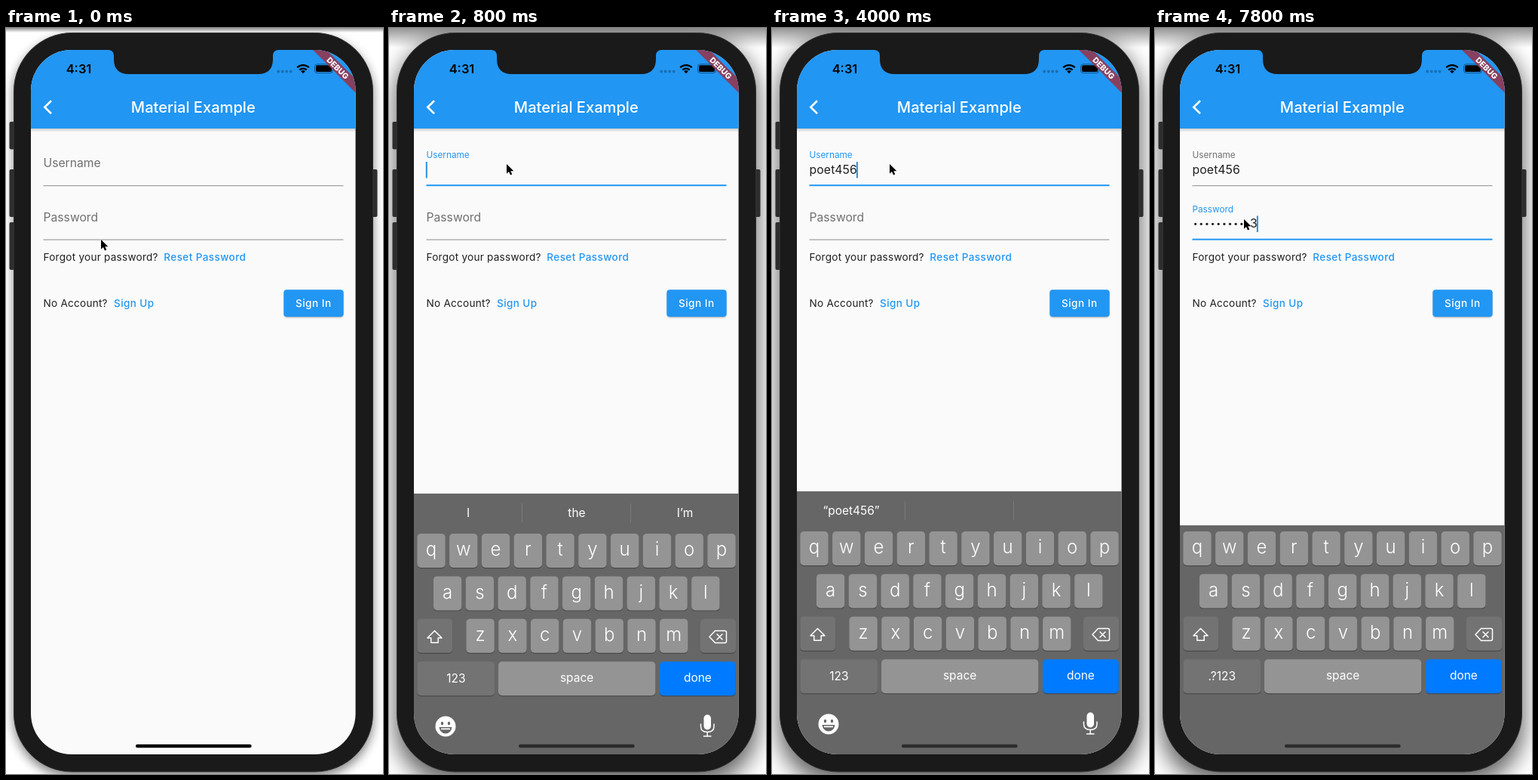
An HTML page that plays this animation: 500x987 px, repeating every 8000 ms.

```html
<!DOCTYPE html>
<html lang="en">
<head>
<meta charset="utf-8">
<title>Sign in form</title>
<style>
  html, body { margin: 0; width: 100%; height: 100%; overflow: hidden; background: #fff; }
  svg { display: block; width: 500px; height: 987px; font-family: Inter, Roboto, sans-serif; }
  .mid { text-anchor: middle; }
  .body { font-size: 13.6px; letter-spacing: .23px; fill: #1f1f1f; }
  .link { font-size: 13.5px; letter-spacing: .42px; font-weight: 500; fill: #2196f3; }
  .field { font-size: 15.8px; letter-spacing: .1px; fill: #1f1f1f; }
  .label { font-size: 15.7px; }
  .key { font-size: 24px; font-weight: 300; fill: #fff; }
  .word { font-size: 15.5px; fill: #fff; }
  .line { fill: none; stroke: #fff; stroke-width: 1.5; stroke-linejoin: round; stroke-linecap: round; }
</style>
</head>
<body>
<svg viewBox="0 0 500 987">
  <defs>
    <clipPath id="screen"><rect x="33" y="29" width="430.600" height="932" rx="54"/></clipPath>
    <filter id="blurS" x="-20%" y="-20%" width="140%" height="140%"><feGaussianBlur stdDeviation="7"/></filter>
    <filter id="blurL" x="-20%" y="-20%" width="140%" height="140%"><feGaussianBlur stdDeviation="15"/></filter>
    <filter id="soft" x="-20%" y="-50%" width="140%" height="200%"><feGaussianBlur stdDeviation="1.3"/></filter>
    <linearGradient id="topS" x2="0" y2="1"><stop stop-color="#000" stop-opacity=".42"/><stop offset="1" stop-opacity="0"/></linearGradient>
    <linearGradient id="barShade" x2="0" y2="1"><stop stop-color="#000" stop-opacity=".18"/><stop offset="1" stop-opacity="0"/></linearGradient>
  </defs>

  <rect width="500" height="987" fill="#fff"/>
  <g id="dimShadow">
    <rect x="10" y="12" width="477" height="978" rx="77" opacity=".5" filter="url(#blurS)"/>
    <rect width="500" height="6" fill="url(#topS)"/>
  </g>
  <g id="deepShadow">
    <rect x="8" y="16" width="481" height="984" rx="77" opacity=".62" filter="url(#blurL)"/>
    <rect width="500" height="26" fill="url(#topS)"/>
  </g>

  <g fill="#2e2e2e">
    <rect x="4.500" y="124" width="10" height="36.500" rx="2"/>
    <rect x="4.500" y="187" width="10" height="63" rx="2"/>
    <rect x="4.500" y="257" width="10" height="63" rx="2"/>
    <rect x="482.500" y="187" width="10" height="63" rx="2"/>
  </g>
  <rect x="10.500" y="6.500" width="476" height="977.500" rx="77" fill="#1a1a1a" stroke="#303030"/>

  <g clip-path="url(#screen)">
    <rect x="33" y="29" width="431" height="932" fill="#fafafa"/>
    <rect x="33" y="133" width="431" height="5" fill="url(#barShade)"/>
    <rect x="33" y="29" width="431" height="104" fill="#2196f3"/>
    <path d="M60 96.300L51.300 104.700L60 113.200" fill="none" stroke="#fff" stroke-width="2.600"/>
    <text class="mid" x="248.300" y="111.800" font-size="20.100" font-weight="500" fill="#fff">Material Example</text>

    <text class="mid" x="96.500" y="59.800" font-size="16.500" font-weight="600">4:31</text>
    <g fill="#000" opacity=".26">
      <circle cx="361.200" cy="57.500" r="1.900"/><circle cx="366.700" cy="57.500" r="1.900"/>
      <circle cx="372.200" cy="57.500" r="1.900"/><circle cx="377.700" cy="57.500" r="1.900"/>
    </g>
    <g fill="none" stroke="#000" stroke-width="2.300">
      <path d="M386.200 52.300A11 11 0 0 1 401.800 52.300"/>
      <path d="M389.300 55.500A6.700 6.700 0 0 1 398.700 55.500"/>
    </g>
    <path d="M391.200 57.300A4 4 0 0 1 396.800 57.300L394 60.200Z"/>
    <rect x="409.500" y="47.800" width="24" height="11.800" rx="3.400" fill="none" stroke="#000" stroke-opacity=".45"/>
    <rect x="411" y="49.300" width="21" height="8.800" rx="2.200"/>

    <g id="fields"></g>
    <text class="body" x="49.500" y="308.300">Forgot your password?</text>
    <text class="link" x="209.300" y="308.300">Reset Password</text>
    <text class="body" x="49.500" y="369">No Account?</text>
    <text class="link" x="143" y="369">Sign Up</text>
    <rect x="369" y="348" width="78" height="35" rx="4" opacity=".35" filter="url(#soft)"/>
    <rect x="368.300" y="346.300" width="79.400" height="35.700" rx="4" fill="#2196f3"/>
    <text class="mid" x="407.800" y="369" font-size="13.600" font-weight="500" letter-spacing=".5" fill="#fff">Sign In</text>

    <g id="keyboard">
      <rect id="board" x="33" width="431" height="400" fill="#666"/>
      <g id="hints">
        <path d="M176.500 626V651M320.500 626V651" stroke="#7b7b7b"/>
      </g>
      <g id="keys"></g>
      <path class="line" d="M60.500 794.500L70 804H65.200V810.300H55.800V804H51Z"/>
      <path class="line" d="M432.500 794.500H445.500Q447.500 794.500 447.500 796.500V808.500Q447.500 810.500 445.500 810.500H432.500L425 802.500ZM435 799L442 806M442 799L435 806"/>
      <g id="extras">
        <circle cx="75" cy="921" r="13.500" fill="#fff"/>
        <g fill="#666">
          <ellipse cx="70.500" cy="917" rx="1.700" ry="2.300"/><ellipse cx="79.500" cy="917" rx="1.700" ry="2.300"/>
          <path d="M66.500 922H83.500Q82 930.500 75 930.500Q68 930.500 66.500 922Z"/>
        </g>
        <path d="M69 924.300H81" stroke="#fff" stroke-width="1.800"/>
        <rect x="417.500" y="905.500" width="9.500" height="20" rx="4.750" fill="#fff"/>
        <path class="line" d="M413.500 918V921Q413.500 928.500 422.200 928.500Q431 928.500 431 921V918M422.200 928.500V934M417.500 934H427"/>
      </g>
    </g>

    <g transform="translate(440 53) rotate(45)">
      <rect x="-60" y="-6.300" width="120" height="12.600" fill="#87405f"/>
      <text class="mid" y="3.800" font-size="10.400" font-weight="800" fill="#fff">DEBUG</text>
    </g>
    <rect id="home" x="172" y="947.700" width="153.700" height="4.600" rx="2.300"/>
  </g>
  <path d="M136 28V29Q143 29.500 143 37V41Q143 61 163 61H334Q354 61 354 41V37Q354 29.500 361 29V28Z" fill="#1a1a1a"/>

  <path id="mouse" d="M0 0V14.500L3.400 11.400L5.700 16.500L8.300 15.400L6 10.400H10.600Z" stroke="#fff" stroke-width="1" paint-order="stroke"/>
</svg>
<script>
const $ = id => document.getElementById(id);
const LOOP = 8000, NAME_AT = 430, PASS_AT = 4530;

function add(parent, tag, attrs, text = '') {
  const el = document.createElementNS('http://www.w3.org/2000/svg', tag);
  for (const k in attrs) el.setAttribute(k, attrs[k]);
  el.textContent = text;
  parent.append(el);
  return el;
}

const clamp = x => Math.max(0, Math.min(1, x));
const mix = (a, b, p) => a + (b - a) * p;
const blend = (a, b, p) => `rgb(${a.map((v, i) => Math.round(mix(v, b[i], p)))})`;
const show = (el, on) => el.setAttribute('visibility', on ? 'visible' : 'hidden');

// cubic-bezier(.4, 0, .2, 1)
function ease(x) {
  x = clamp(x);
  let lo = 0, hi = 1, s = x;
  for (let i = 0; i < 20; i++) {
    s = (lo + hi) / 2;
    const bx = 1.2 * s * (1 - s) ** 2 + .6 * s * s * (1 - s) + s ** 3;
    if (bx < x) lo = s; else hi = s;
  }
  return 3 * s * s * (1 - s) + s ** 3;
}

// Keyboard
function key(x, y, w, label, cls, fill = '#949494', dy = 29.3) {
  add($('keys'), 'rect', { x, y: y + 1.2, width: w, height: 45, rx: 5, fill: '#4a4a4a' });
  add($('keys'), 'rect', { x, y, width: w, height: 45, rx: 5, fill });
  return add($('keys'), 'text', { x: x + w / 2, y: y + dy, class: 'mid ' + cls }, label);
}
[['qwertyuiop', 37.3, 666], ['asdfghjkl', 58.9, 722.4], ['zxcvbnm', 102.4, 778.8]].forEach(([row, x, y]) =>
  [...row].forEach((c, i) => key(x + i * 42.78, y, 37.4, c, 'key')));
key(37.3, 778.8, 47, '', 'word', '#737373');
key(413, 778.8, 47, '', 'word', '#737373');
const modeKey = key(37.3, 835.2, 103, '123', 'word', '#737373', 27.8);
key(145, 835.2, 208.3, 'space', 'word', '#949494', 26.5);
key(359, 835.2, 100.8, 'done', 'word', '#007aff', 26.5);
const hints = [105, 249, 392.5].map(x => add($('hints'), 'text', { x, y: 644.3, class: 'mid word' }));

// Form fields
function makeField(name, y) {
  const g = $('fields');
  return {
    y,
    line: add(g, 'rect', { x: 49.5, width: 398 }),
    label: add(g, 'text', { class: 'label' }, name),
    dots: add(g, 'g', { fill: '#1f1f1f' }),
    text: add(g, 'text', { class: 'field', y: y + 14.5 }),
    caret: add(g, 'rect', { y: y - 1, width: 2, height: 21.5, fill: '#2b8fe0' })
  };
}
const nameField = makeField('Username', 178), passField = makeField('Password', 249.5);
const GREY = [112, 112, 112], BLUE = [33, 150, 243], RULE = [158, 158, 158];

function drawField(f, float, focus) {
  const h = 1.2 + .8 * focus;
  f.line.setAttribute('y', f.y + 31.2 - h);
  f.line.setAttribute('height', h);
  f.line.setAttribute('fill', blend(RULE, BLUE, focus));
  f.label.setAttribute('transform', `translate(49.5 ${f.y + mix(6, -5.7, float)}) scale(${mix(1, .75, float)})`);
  f.label.setAttribute('fill', blend(GREY, BLUE, focus));
}

function drawText(f, str, hidden, on, since) {
  const x = 49.5 + hidden * 7.65;
  while (f.dots.childNodes.length > hidden) f.dots.lastChild.remove();
  while (f.dots.childNodes.length < hidden)
    add(f.dots, 'circle', { cx: 53.6 + f.dots.childNodes.length * 7.65, cy: f.y + 9.8, r: 1.6 });
  f.text.setAttribute('x', x);
  if (f.text.textContent !== str) f.text.textContent = str;
  f.caret.setAttribute('x', str ? x + f.text.getComputedTextLength() - 1 : 48.8);
  f.caret.setAttribute('opacity', on ? blink(since) : 0);
}

function blink(age) {
  const u = age - 620;
  if (u < 0) return 1;
  const fade = clamp(u % 500 / 250);
  return u % 1000 < 500 ? 1 - fade : fade;
}

// Suggested words fade in letter by letter
function drawHint(el, word, rise) {
  el.textContent = '';
  [...word].forEach((c, i) =>
    add(el, 'tspan', { 'fill-opacity': rise > .95 ? 1 : clamp(rise * 2.2 - .45 - i * .3) }, c));
}

// Typing
const login = 'poet456', loginAt = [1900, 2100, 2400, 2700, 3000, 3200, 3400];
const secret = 'password123', secretAt = [6200, 6300, 6500, 6700, 6800, 6900, 7100, 7200, 7300, 7600, 7800];
const guesses = [['people', 'please'], ['point', 'post'], ['poem', 'poet'], ['poet4', 'poet456'], ['poet45', 'poet456'], ['poet456', ''], ['', '']];
const typed = (times, t) => times.filter(x => x <= t).length;

const glide = [[50, 126, 280], [300, 156, 180], [4300, 156, 180], [4500, 118, 253]];
function mouseAt(t) {
  let i = glide.findIndex(p => p[0] > t);
  if (i < 0) i = glide.length;
  const a = glide[Math.max(0, i - 1)], b = glide[Math.min(i, glide.length - 1)];
  const p = a === b ? 0 : ease((t - a[0]) / (b[0] - a[0]));
  return [mix(a[1], b[1], p), mix(a[2], b[2], p)];
}

function draw(t) {
  show($('dimShadow'), t < 300);
  show($('deepShadow'), t >= 300);
  $('mouse').setAttribute('transform', `translate(${mouseAt(t)}) scale(.88)`);

  const nameIn = ease((t - NAME_AT) / 200), passIn = ease((t - PASS_AT) / 200);
  drawField(nameField, nameIn, nameIn - passIn);
  drawField(passField, passIn, passIn);

  const n = typed(loginAt, t), m = typed(secretAt, t);
  drawText(nameField, login.slice(0, n), 0, t >= NAME_AT && t < PASS_AT, t - (n ? loginAt[n - 1] : NAME_AT));
  drawText(passField, m ? secret[m - 1] : '', Math.max(0, m - 1), t >= PASS_AT, t - (m ? secretAt[m - 1] : PASS_AT));

  // critically damped spring
  const u = Math.max(0, t - 427) * .0182, rise = 1 - (1 + u) * Math.exp(-u);
  const secure = t >= PASS_AT;
  $('keyboard').setAttribute('transform', `translate(0 ${348 * (1 - rise)})`);
  $('board').setAttribute('y', secure ? 658 : 613);
  show($('hints'), !secure);
  show($('extras'), !secure);
  modeKey.textContent = secure ? '.?123' : '123';
  const words = n ? [`“${login.slice(0, n)}”`, ...guesses[n - 1]] : ['I', 'the', 'I’m'];
  hints.forEach((el, i) => drawHint(el, words[i], rise));
  $('home').setAttribute('fill', blend([0, 0, 0], [44, 44, 44], clamp(rise * 2 - 1)));
}

const start = performance.now();
function tick() {
  draw((performance.now() - start) % LOOP);
  requestAnimationFrame(tick);
}
tick();
</script>
</body>
</html>
```
